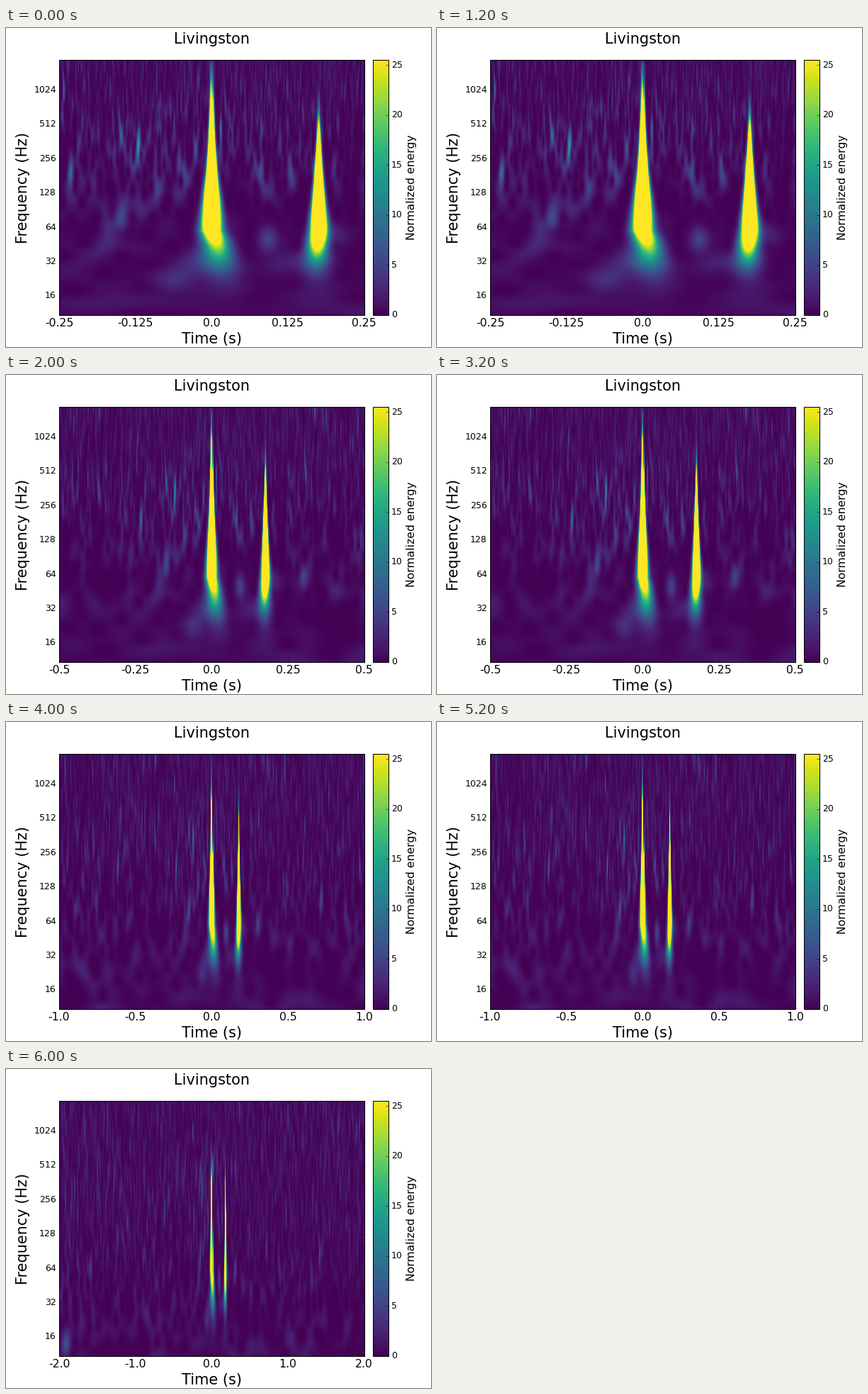
Write a matplotlib script that moves like this. It is 600 px wide and 450 px high and loops after 8 s.

```python
import numpy as np
import matplotlib.pyplot as plt
from matplotlib.animation import FuncAnimation

plt.rcParams.update({
    "font.family": "DejaVu Sans",
    "axes.linewidth": 1.0,
    "xtick.direction": "in", "ytick.direction": "in",
    "xtick.top": True, "ytick.right": True,
    "xtick.major.size": 4, "ytick.major.size": 4,
    "xtick.major.width": 0.5, "ytick.major.width": 0.5,
    "xtick.major.pad": 4, "ytick.major.pad": 4,
    "ytick.alignment": "center",
})

WIDTH, HEIGHT = 600, 450
COLS, ROWS = 430, 360
LOG_MIN, LOG_MAX = 3.44, 10.88      # log2 of the frequency limits
VMAX = 25.5
HALF_SPANS = [0.25, 0.5, 1.0, 2.0]  # seconds either side of zero
TICKS = np.linspace(-1, 1, 5)
RATE, SPAN = 2048, 4.0

# time (s), frequency (Hz), energy of the brightest background blobs
BLOBS = [(-0.231, 195, 7), (-0.12, 305, 7), (-0.148, 77, 5), (0.014, 480, 8),
         (0.092, 50, 5), (-0.06, 22, 3), (0.3, 60, 4), (-1.91, 14, 6)]

log_f = LOG_MIN + (np.arange(ROWS)[:, None] + 0.5) / ROWS * (LOG_MAX - LOG_MIN)
freq = 2 ** log_f


def gauss(x):
    return np.exp(-x ** 2)


def noise_energy():
    """Energy of white noise seen through a constant-Q filter bank."""
    rng = np.random.default_rng(7)
    n = int(RATE * SPAN)
    spectrum = rng.normal(size=n) + 1j * rng.normal(size=n)
    bins = np.arange(n) / SPAN
    response = np.exp(-0.5 * ((bins - freq) / (freq / 5)) ** 2)
    energy = np.abs(np.fft.ifft(spectrum * response, axis=1)) ** 2
    energy /= energy.mean(axis=1, keepdims=True)

    # Quieter at low frequencies, livelier around the bursts.
    t = np.arange(n) / RATE - SPAN / 2
    gain = np.interp(log_f, [5, 8], [0.6, 0.9])
    return energy * gain * (1 + 0.7 * gauss(t / 0.25) * gauss((log_f - 8) / 1.2))


def burst(t, start, base, tip, strength, spread, lean):
    """A spike saturated from base to tip (log2 Hz) that widens as 1/f."""
    peak = strength * (tip - log_f) * (log_f - base)
    width = np.hypot(0.0021, spread / (freq + 12))
    center = start + lean * np.maximum(0, 60 - freq)
    return VMAX * np.exp(peak - ((t - center) / width) ** 2)


def blob(t, when, f, energy):
    return energy * gauss((t - when) * f / 0.8) * gauss((log_f - np.log2(f)) / 0.36)


def noise_at(t):
    return NOISE[:, np.clip((t + SPAN / 2) * RATE, 0, RATE * SPAN - 1).astype(int)]


def spectrogram(half):
    step = 2 * half / COLS
    t = -half + step * (np.arange(COLS) + 0.5)
    energy = (noise_at(t - step / 2) + noise_at(t + step / 2)) / 2
    energy += burst(t, 0.0, 5.5, 10.0, 0.35, 1.16, 0.0005)
    energy += burst(t, 0.175, 5.35, 9.05, 0.55, 0.85, -0.0001)
    return energy + sum(blob(t, *spot) for spot in BLOBS)


NOISE = noise_energy()
VIEWS = [spectrogram(half) for half in HALF_SPANS]

fig = plt.figure(figsize=(8, 6), dpi=75, facecolor="white")


def pixel_axes(left, top, right, bottom):
    return fig.add_axes([left / WIDTH, 1 - bottom / HEIGHT,
                         (right - left) / WIDTH, (bottom - top) / HEIGHT])


ax = pixel_axes(75, 45, 505.56, 405)
image = ax.imshow(VIEWS[0], origin="lower", aspect="auto", cmap="viridis",
                  vmin=0, vmax=VMAX, interpolation="nearest",
                  extent=[-1, 1, LOG_MIN, LOG_MAX])
ax.set_xticks(TICKS)
ax.set_yticks(range(4, 11), [str(2 ** k) for k in range(4, 11)])
ax.tick_params(axis="x", labelsize=15)
ax.tick_params(axis="y", labelsize=12)
ax.set_title("Livingston", fontsize=20, y=1.05, pad=5)
ax.set_xlabel("Time (s)", fontsize=20, labelpad=5)
ax.set_ylabel("Frequency (Hz)", fontsize=20, labelpad=5)

bar = fig.colorbar(image, cax=pixel_axes(518.47, 45, 540, 405), ticks=range(0, 26, 5))
bar.ax.tick_params(labelsize=12, left=False)
bar.set_label("Normalized energy", fontsize=15, labelpad=5)


def update(i):
    image.set_data(VIEWS[i])
    ax.set_xticklabels([str(float(HALF_SPANS[i] * k)) for k in TICKS])
    return [image]


animation = FuncAnimation(fig, update, frames=len(HALF_SPANS), interval=2000,
                          repeat=True, repeat_delay=0)
plt.show()
```
